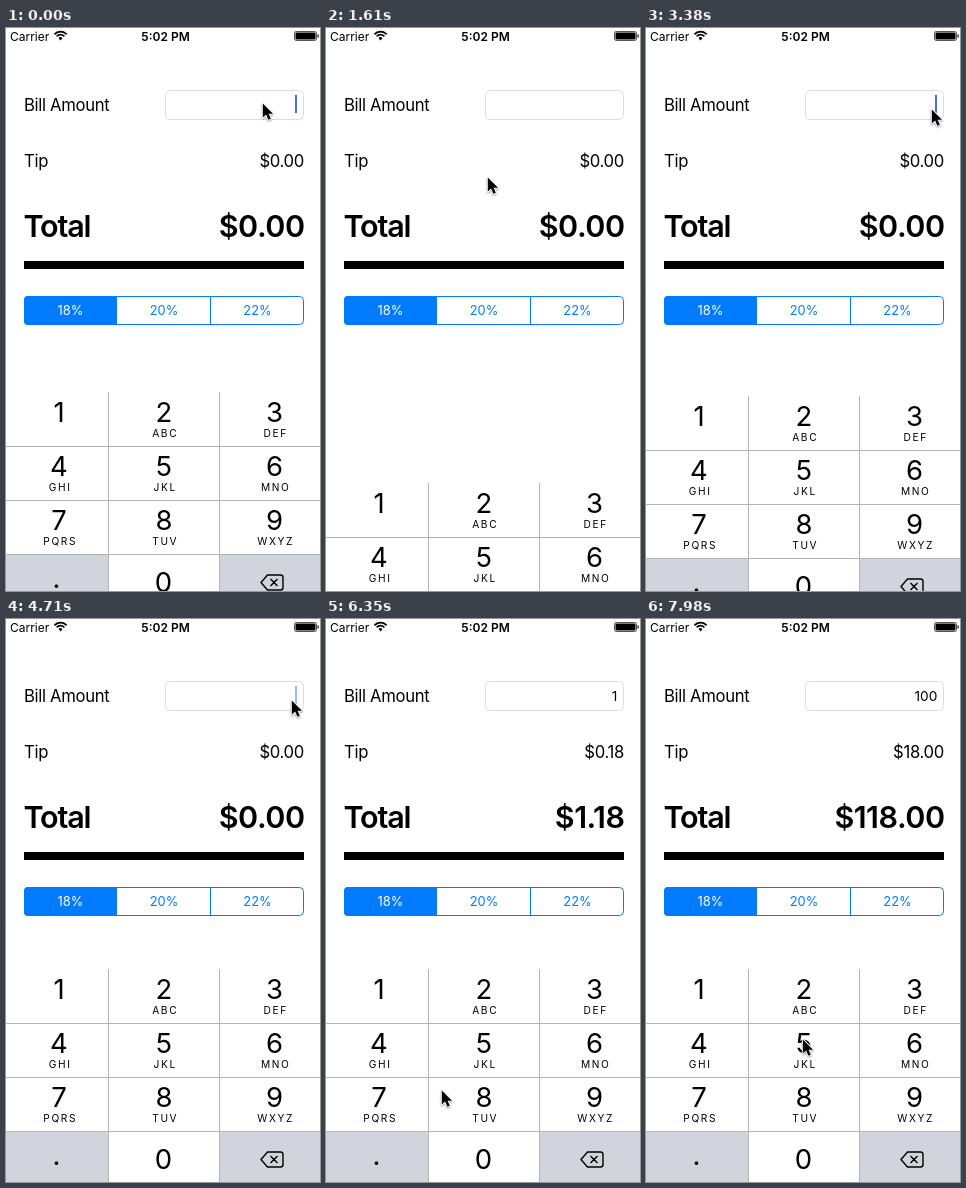
An HTML page with a canvas that plays this animation: 314x563 px, repeating every 8000 ms.

```html
<!DOCTYPE html>
<html lang="en">
<head>
<meta charset="utf-8">
<title>Tip calculator</title>
<style>
html, body { margin: 0; width: 100%; height: 100%; overflow: hidden; background: #fff; }
canvas { display: block; width: 314px; height: 563px; }
</style>
</head>
<body>
<canvas id="stage" width="314" height="563"></canvas>
<script>
const ctx = document.getElementById('stage').getContext('2d');
const W = 314, H = 563, LOOP = 8000;
const TICK = 147.8;              // the screen refreshes once per tick
const BLUE = '#007aff', KEY_GRAY = '#d1d5db', LINE = '#b2b4b8';
const KEYBOARD_TOP = 350, ROW = 54;

const COLUMNS = [
  { x: 0, w: 102, mid: 53 },
  { x: 103, w: 110, mid: 158 },
  { x: 214, w: 100, mid: 268.5 }
];
const LETTERS = ['', 'ABC', 'DEF', 'GHI', 'JKL', 'MNO', 'PQRS', 'TUV', 'WXYZ'];

// All times below are in ticks.
const SLIDES = [
  { at: -1.5, up: true },
  { at: 10.435, up: false },
  { at: 21.605, up: true }
];
const BLINKS = [[-2, 2], [6, 9], [22, 25], [29, 32], [38, 42], [46, 53]];
const ENTRIES = [[38, 1], [47, 10], [49, 100]];
const PRESSES = [['1', 37, 38], ['0', 46, 47], ['0', 49, 49]];
const POINTER = [
  [4, 256, 75], [9.6, 161, 149],
  [15, 161, 149], [20, 285, 81],
  [32, 285, 81], [35, 100, 455], [37, 70, 365],
  [39, 70, 365], [45.5, 137, 523],
  [52, 137, 523], [54, 156, 420]
];

const smooth = p => p * p * (3 - 2 * p);
const money = v => '$' + v.toFixed(2);

function text(str, x, y, size, { weight = 400, align = 'left', color = '#000', spacing = 0 } = {}) {
  ctx.font = `${weight} ${size}px Inter, "Liberation Sans", sans-serif`;
  ctx.letterSpacing = spacing + 'px';
  ctx.textAlign = align;
  ctx.fillStyle = color;
  ctx.fillText(str, x, y);
}

function rect(x, y, w, h, color) {
  ctx.fillStyle = color;
  ctx.fillRect(x, y, w, h);
}

function roundRect(x, y, w, h, r, stroke, fill) {
  ctx.beginPath();
  ctx.roundRect(x, y, w, h, r);
  if (fill) { ctx.fillStyle = fill; ctx.fill(); }
  if (stroke) { ctx.strokeStyle = stroke; ctx.lineWidth = 1; ctx.stroke(); }
}

function keyboardOffset(t) {
  const slide = SLIDES.findLast(s => t >= s.at);
  const k = 2.94 * (t - slide.at);
  const left = (1 + k) * Math.exp(-k);
  return Math.round((H - KEYBOARD_TOP) * (slide.up ? left : 1 - left));
}

function caretAlpha(t) {
  const blink = BLINKS.findLast(b => t >= b[0]);
  return t < blink[1] ? 1 : t === blink[1] ? 0.5 : 0;
}

function pointerAt(t) {
  const next = POINTER.findIndex(p => p[0] > t);
  if (next === 0) return POINTER[0].slice(1);
  if (next < 0) return POINTER.at(-1).slice(1);
  const [t0, x0, y0] = POINTER[next - 1], [t1, x1, y1] = POINTER[next];
  const p = smooth((t - t0) / (t1 - t0));
  return [x0 + (x1 - x0) * p, y0 + (y1 - y0) * p];
}

function drawStatusBar() {
  text('Carrier', 4, 12.5, 12);
  text('5:02 PM', 159.5, 12.5, 12, { weight: 600, align: 'center' });

  ctx.strokeStyle = '#000';
  ctx.lineWidth = 1.7;
  for (const r of [8.3, 5.3]) {
    ctx.beginPath();
    ctx.arc(54.5, 12, r, -Math.PI * 0.76, -Math.PI * 0.24);
    ctx.stroke();
  }
  ctx.beginPath();
  ctx.moveTo(54.5, 12.5);
  ctx.arc(54.5, 12, 2.8, -Math.PI * 0.76, -Math.PI * 0.24);
  ctx.fillStyle = '#000';
  ctx.fill();

  roundRect(288.5, 3.5, 22, 9, 1.8, '#555');
  roundRect(289.5, 4.5, 20, 7, 1, null, '#000');
  rect(311.4, 6.5, 1.4, 3, '#333');
}

function drawForm(t) {
  const entry = ENTRIES.findLast(e => t >= e[0]);
  const bill = entry ? entry[1] : 0, tip = bill * 0.18;
  const body = { spacing: -0.33 }, right = { align: 'right', spacing: -0.33 };

  text('Bill Amount', 18, 83, 16.7, body);
  roundRect(159.5, 62.5, 138, 29, 5, '#dcdcdc', '#fff');
  if (bill) text(String(bill), 291.3, 82, 13.7, { align: 'right' });
  ctx.globalAlpha = caretAlpha(t);
  rect(289, 67, 2, 18, '#426bf2');
  ctx.globalAlpha = 1;

  text('Tip', 18, 139, 16.7, body);
  text(money(tip), 298, 139, 16.7, right);

  text('Total', 17.5, 209, 30.5, { weight: 600, spacing: -1.2 });
  text(money(bill + tip), 298.5, 209, 30.5, { weight: 600, align: 'right', spacing: -0.5 });
  rect(18, 233, 280, 8, '#000');
}

function drawSegments() {
  roundRect(18.5, 268.5, 279, 28, 4, BLUE);
  roundRect(18, 268, 93, 29, [4, 0, 0, 4], null, BLUE);
  rect(204, 268, 1, 29, BLUE);
  ['18%', '20%', '22%'].forEach((label, i) =>
    text(label, 64.5 + i * 93.5, 287, 12.9, { align: 'center', color: i ? BLUE : '#fff' }));
}

function drawDeleteIcon(y) {
  ctx.strokeStyle = '#000';
  ctx.lineWidth = 1.4;
  ctx.lineJoin = 'round';
  ctx.beginPath();
  ctx.moveTo(255, y);
  ctx.lineTo(261.5, y - 7.5);
  ctx.arcTo(277, y - 7.5, 277, y, 2.5);
  ctx.arcTo(277, y + 7.5, 261.5, y + 7.5, 2.5);
  ctx.lineTo(261.5, y + 7.5);
  ctx.closePath();
  ctx.moveTo(264.5, y - 3.5);
  ctx.lineTo(271.5, y + 3.5);
  ctx.moveTo(271.5, y - 3.5);
  ctx.lineTo(264.5, y + 3.5);
  ctx.stroke();
}

function drawKeyboard(t) {
  const top = KEYBOARD_TOP + keyboardOffset(t);
  if (top >= H) return;
  const pressed = PRESSES.find(p => t >= p[1] && t <= p[2])?.[0];
  const digit = (s, x, y) => text(s, x, y, 27.5, { align: 'center' });
  const back = (col, row) =>
    rect(COLUMNS[col].x, top + row * ROW, COLUMNS[col].w, ROW, KEY_GRAY);

  rect(0, top, W, H - top, '#fff');
  back(0, 3);
  back(2, 3);
  if (pressed === '1') back(0, 0);
  if (pressed === '0') back(1, 3);

  for (let row = 1; row < 4; row++) rect(0, top + row * ROW, W, 1, LINE);
  for (const x of [102, 213]) rect(x, top, 1, H - top, LINE);

  LETTERS.forEach((letters, i) => {
    const x = COLUMNS[i % 3].mid, y = top + Math.floor(i / 3) * ROW;
    digit(String(i + 1), x, y + 30);
    text(letters, x + 1.2, y + 45, 10.2, { align: 'center', spacing: 1.6 });
  });
  digit('.', 50.5, top + 196);
  digit('0', 157.5, top + 199.5);
  drawDeleteIcon(top + 190.5);
}

function drawPointer(t) {
  const [x, y] = pointerAt(t);
  ctx.save();
  ctx.translate(Math.round(x) + 0.8, Math.round(y) + 0.5);
  ctx.beginPath();
  [[0, 0], [0, 14], [3.3, 11], [5.6, 16.2], [8, 15.2], [5.8, 10.2], [10.2, 10.2]]
    .forEach(p => ctx.lineTo(...p));
  ctx.closePath();
  ctx.lineJoin = 'round';
  ctx.lineWidth = 1.8;
  ctx.strokeStyle = '#fff';
  ctx.shadowColor = 'rgba(0,0,0,0.4)';
  ctx.shadowBlur = 2;
  ctx.shadowOffsetY = 1;
  ctx.stroke();
  ctx.shadowColor = 'transparent';
  ctx.fillStyle = '#000';
  ctx.fill();
  ctx.restore();
}

function draw(now) {
  const t = Math.floor((now % LOOP + 27) / TICK);
  rect(0, 0, W, H, '#fff');
  drawStatusBar();
  drawForm(t);
  drawSegments();
  drawKeyboard(t);
  drawPointer(t);
}

const start = performance.now();
function loop() {
  draw(performance.now() - start);
  requestAnimationFrame(loop);
}
loop();
</script>
</body>
</html>
```
